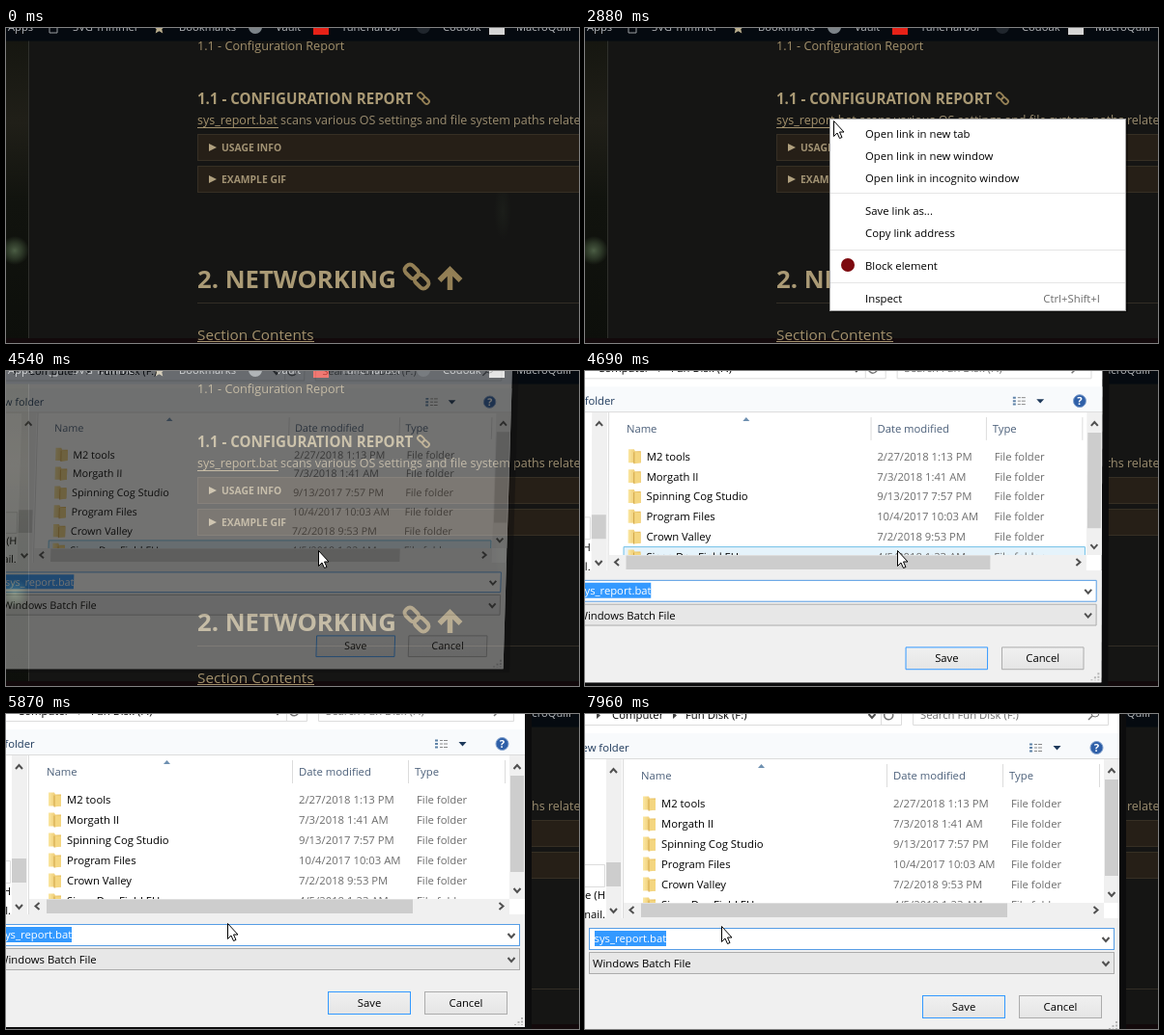
Animation of 593x327 px, one loop 7.99 s. Source, as an HTML page:

```html
<!DOCTYPE html>
<html lang="en">
<head>
<meta charset="utf-8">
<title>Saving a linked file</title>
<style>
  html, body { margin: 0; width: 100%; height: 100%; overflow: hidden; background: #141414; }
  svg { display: block; width: 593px; height: 327px; font: 11.3px "Open Sans", "Noto Sans", sans-serif; }
  .bar { font-size: 11.2px; fill: #b4b7ba; }
  .body { font-size: 12.5px; fill: #9b8d70; }
  .link { fill: #a3916c; }
  .head { font-weight: 700; fill: #aa9a75; }
  .small { font-size: 10.35px; font-weight: 700; fill: #a19273; }
  .menu { font-size: 11.35px; }
  .muted { fill: #6d6d6d; }
  .navy { fill: #1e395b; }
  .column { fill: #4c607a; }
  .line { fill: none; stroke: #dcdcdc; }
  .track { fill: #f0f0f0; }
  .thumb { fill: #cdcdcd; }
</style>
</head>
<body>
<svg viewBox="0 0 593 327">
  <defs>
    <linearGradient id="forest" x2="0" y2="1">
      <stop offset="0" stop-color="#14150f"/>
      <stop offset=".3" stop-color="#201f18"/>
      <stop offset=".55" stop-color="#11130e"/>
      <stop offset="1" stop-color="#0d0f0b"/>
    </linearGradient>
    <radialGradient id="glow">
      <stop offset="0" stop-color="#4c5e45"/>
      <stop offset=".5" stop-color="#364430" stop-opacity=".8"/>
      <stop offset="1" stop-color="#364430" stop-opacity="0"/>
    </radialGradient>
    <linearGradient id="folderFill">
      <stop offset="0" stop-color="#fbe7a2"/>
      <stop offset="1" stop-color="#e3b54e"/>
    </linearGradient>
    <linearGradient id="buttonFill" x2="0" y2="1">
      <stop offset="0" stop-color="#f0f0f0"/>
      <stop offset="1" stop-color="#e5e5e5"/>
    </linearGradient>
    <path id="chevron" d="M-3.5-2L0 2L3.5-2" fill="none" stroke="#505050" stroke-width="2"/>
    <g id="chain" transform="rotate(45)" fill="none" stroke="#937f55" stroke-width="4">
      <rect x="-15" y="-5.200" width="15.500" height="10.400" rx="4.500"/>
      <rect x="-.5" y="-5.200" width="15.500" height="10.400" rx="4.500"/>
    </g>
    <g id="folder">
      <path d="M0 0h6l1 2h6v12H0z" fill="url(#folderFill)"/>
      <path d="M6 3h7v11l-7 1z" fill="#f4d680"/>
      <path d="M6 3v12" stroke="#c99a3c" stroke-width=".8"/>
    </g>
  </defs>

  <g id="page">
    <rect width="593" height="327" fill="#151514"/>
    <rect width="23" height="327" fill="url(#forest)"/>
    <circle cx="9" cy="231" r="15" fill="url(#glow)"/>
    <ellipse cx="514" cy="190" rx="9" ry="30" fill="url(#glow)" opacity=".12"/>
    <path d="M23.5 13V327" stroke="#2f302c"/>
    <rect y="322" width="593" height="5" fill="#12090b"/>
    <rect width="593" height="13.5" fill="#050a10"/>
    <g class="bar">
      <text x="2" y="3">Apps</text>
      <path d="M45-6h8V5h-8z" fill="none" stroke="#9a9da0"/>
      <text x="69" y="3">SVG Trimmer</text>
      <path d="M158.500-6l1.800 4 4.200.4-3.200 2.800 1 4.300-3.800-2.300-3.800 2.300 1-4.300-3.200-2.800 4.200-.4z" fill="#b9ad8d"/>
      <text x="179" y="3">Bookmarks</text>
      <circle cx="258" cy="-1" r="7" fill="#7c8388"/>
      <text x="279" y="3">Vault</text>
      <rect x="318" y="-9" width="16" height="16" fill="#e62117"/>
      <text x="347" y="3">TuneHarbor</text>
      <circle cx="432" cy="-1" r="7" fill="#20262d"/>
      <text x="452" y="3">Codoak</text>
      <rect x="500" y="-9" width="16" height="16" fill="#d5d5d5"/>
      <text x="528" y="3">MacroQuill</text>
    </g>

    <text class="body link" x="198" y="22.500" style="font-size:12.65px">1.1 - Configuration Report</text>
    <text class="head" x="198" y="78.500" font-size="15.100">1.1 - CONFIGURATION REPORT</text>
    <use href="#chain" transform="translate(432 73) scale(.48)"/>
    <rect id="linkHover" x="198" y="88" width="84" height="16" fill="#3b2b1c"/>
    <text class="body" x="198" y="100"><tspan class="link">sys_report.bat</tspan> scans various OS settings and file system paths related to</text>
    <path d="M198 103.500h84" stroke="#a3916c"/>
    <g fill="#261f17" stroke="#362f24">
      <rect x="198.500" y="110.500" width="400" height="27"/>
      <rect x="198.500" y="143.500" width="400" height="27"/>
    </g>
    <path d="M210 120l8 4-8 4zM210 153l8 4-8 4z" fill="#b0a07e"/>
    <text class="small" x="223" y="128">USAGE INFO</text>
    <text class="small" x="223" y="161">EXAMPLE GIF</text>
    <text class="head" x="198" y="269.500" font-size="25.700">2. NETWORKING</text>
    <use href="#chain" transform="translate(425 258)"/>
    <path d="M448.500 262L459.500 251L470.500 262M459.500 253V272" fill="none" stroke="#937f55" stroke-width="5.500"/>
    <path d="M198 285.500H593" stroke="#332e26"/>
    <text class="body link" x="198" y="324" style="font-size:15.3px">Section Contents</text>
    <path d="M198 325.500h121" stroke="#a3916c"/>
  </g>

  <g id="menu" class="menu">
    <rect x="256" y="97" width="306" height="198" fill="#000" opacity=".35"/>
    <rect x="253.500" y="94.500" width="306" height="199" fill="#fff" stroke="#a5a5a5"/>
    <rect id="menuHover" x="254" width="305" height="23" fill="#e9e9e9"/>
    <path d="M254 171.500h305M254 230.500h305M254 264.500h305" stroke="#e5e5e5"/>
    <circle cx="272" cy="246" r="7" fill="#7d0a0f"/>
    <g id="menuItems"></g>
    <text class="muted" x="533" y="285" text-anchor="end">Ctrl+Shift+I</text>
  </g>

  <g id="dialog">
    <rect x="-60" y="-40" width="604" height="369" fill="#0c0c0d"/>
    <rect x="-60" y="-40" width="597" height="365" fill="#fff"/>
    <path class="line" d="M-60 7.500H311.500V-20M290.500-20V7M323.500-20V7.500H525.500V-20"/>
    <text x="12" y="1">Computer</text>
    <text x="88" y="1">Fun Disk (F:)</text>
    <text class="muted" x="331" y="1">Search Fun Disk (F:)</text>
    <path d="M75-6l4 3.500-4 3.500zM-4-6l4 3.500-4 3.500z" fill="#444"/>
    <use href="#chevron" x="281" y="-2"/>
    <path d="M302.500-4a4.500 4.500 0 1 1-3-3M509-2L505 2" fill="none" stroke="#777" stroke-width="1.500"/>
    <circle cx="512" cy="-5" r="4" fill="none" stroke="#777"/>

    <rect x="-60" y="16" width="597" height="26" fill="#f8fafc"/>
    <path class="line" d="M-60 42.500H537"/>
    <text class="navy" x="-28" y="35">New folder</text>
    <path d="M444 27.500h3M444 31h3M444 34.500h3" stroke="#5f83a8" stroke-width="2"/>
    <path d="M449 27.500h3m1 0h4M449 31h3m1 0h4M449 34.500h3m1 0h4" stroke="#888"/>
    <path d="M468.500 29h8l-4 4.500z" fill="#1e395b"/>
    <circle cx="513.500" cy="31" r="6.500" fill="#2e5fa8" stroke="#7f9fcc"/>
    <text x="513.500" y="35" text-anchor="middle" font-weight="700" fill="#fff">?</text>

    <path class="line" d="M-60 152.500H4.500V175.500H-60"/>
    <text x="5" y="188" text-anchor="end">Archive (H</text>
    <text x="5" y="208" text-anchor="end">mail.</text>
    <rect class="track" x="6" y="43" width="16" height="165"/>
    <rect class="thumb" x="6" y="150" width="15" height="25"/>
    <use href="#chevron" transform="translate(13.500 55) scale(1 -1)"/>
    <use href="#chevron" x="13.500" y="200"/>
    <path class="line" d="M23.500 43V208M296.500 48V72M416.500 48V72M516.500 48V72"/>

    <path d="M163 52l3.500-4 3.500 4z" fill="#6d8fb0"/>
    <g class="column">
      <text x="42" y="64">Name</text>
      <text x="303" y="64">Date modified</text>
      <text x="423" y="64">Type</text>
    </g>
    <rect id="rowHover" x="39.500" width="480" height="20" fill="#e5f3fb" stroke="#70c0e7"/>
    <g id="rows"></g>
    <rect class="track" x="24" y="192" width="497" height="16"/>
    <rect class="thumb" x="42" y="192.500" width="379" height="14.500"/>
    <use href="#chevron" transform="translate(32.500 199.500) rotate(90)"/>
    <use href="#chevron" transform="translate(512.500 199.500) rotate(-90)"/>
    <rect class="track" x="521" y="43" width="16" height="149"/>
    <rect class="thumb" x="522" y="64" width="14" height="100"/>
    <use href="#chevron" transform="translate(529 55) scale(1 -1)"/>
    <use href="#chevron" x="529" y="183"/>

    <rect x="-60" y="208" width="597" height="117" fill="#f0f0f0"/>
    <rect x="-11.500" y="218.500" width="543" height="22" fill="#fff" stroke="#569de5"/>
    <rect x="-6" y="221" width="74" height="16" fill="#3399ff"/>
    <text x="-6.500" y="233" fill="#fff">sys_report.bat</text>
    <rect x="-11.500" y="243.500" width="543" height="22" fill="#e7e7e7" stroke="#acacac"/>
    <text x="-8" y="259">Windows Batch File</text>
    <use href="#chevron" x="523" y="230"/>
    <use href="#chevron" x="523" y="255"/>
    <g fill="url(#buttonFill)">
      <rect x="333.500" y="288.500" width="85" height="23" stroke="#3399ff"/>
      <rect x="433.500" y="288.500" width="85" height="23" stroke="#acacac"/>
    </g>
    <g text-anchor="middle">
      <text x="376" y="304">Save</text>
      <text x="476" y="304">Cancel</text>
    </g>
    <path d="M534 315v8M530.500 319v4M527 322v1" stroke="#b5b5b5" stroke-width="2" stroke-dasharray="2 1.500"/>
  </g>

  <g id="pointer" fill="#fff" stroke="#000">
    <path id="arrow" d="M.5.5V16.500L4 13L6.500 18.500L9 17.500L6.500 12H11z"/>
    <path id="hand" transform="translate(-6.500)" d="M5 2Q5 .5 6.500 .5T8 2V8Q10 6.500 11 8.500Q13 7.500 13.500 9.500Q16 9 16.500 11.500V15Q16 18 14.500 20V22H6.500V20L1 13.500Q-.5 11.500 1.500 11T5 13z"/>
  </g>
</svg>
<script>
const LOOP = 7990;
const byId = id => document.getElementById(id);
const clamp = v => Math.min(1, Math.max(0, v));
const show = (id, visible) => byId(id).setAttribute('display', visible ? 'inline' : 'none');

const menuItems = [
  [110, 'Open link in new tab'], [133, 'Open link in new window'],
  [156, 'Open link in incognito window'], [190, 'Save link as...'],
  [213, 'Copy link address'], [247, 'Block element'], [281, 'Inspect']
];
byId('menuItems').innerHTML = menuItems
  .map(([y, label]) => `<text x="290" y="${y + 4}">${label}</text>`).join('');

const ROW_TOP = 78.5, ROW_HEIGHT = 21;
const folders = [
  ['M2 tools', '2/27/2018 1:13 PM'], ['Morgath II', '7/3/2018 1:41 AM'],
  ['Spinning Cog Studio', '9/13/2017 7:57 PM'], ['Program Files', '10/4/2017 10:03 AM'],
  ['Crown Valley', '7/2/2018 9:53 PM'], ['Siege Day Field EU', '4/5/2018 1:23 AM']
];
byId('rows').innerHTML = folders.map(([name, date], i) => {
  const y = 93 + i * ROW_HEIGHT;
  return `<use href="#folder" x="44" y="${y - 11.5}"/><text x="63" y="${y}">${name}</text>
    <g class="muted"><text x="303" y="${y}">${date}</text><text x="425" y="${y}">File folder</text></g>`;
}).join('');

// Pointer path as [time, x, y]; it rests wherever a position repeats.
const path = [
  [40, 499, 306], [940, 499, 306], [1060, 503, 222], [1280, 503, 222],
  [1960, 257, 96], [3130, 257, 96], [3620, 326, 186], [4460, 326, 186],
  [4490, 323, 186], [5070, 323, 186], [5330, 293, 190], [5480, 180, 150],
  [5600, 190, 86], [5740, 290, 140], [5870, 230, 217], [6050, 130, 110],
  [6250, 90, -30], [7100, 90, -30], [7130, 150, -30], [7530, 138, 220],
  [7930, 138, 220], [7960, 141, 220], [LOOP, 141, 220]
];

function slope(i, axis) {
  const before = path[i - 1], at = path[i], after = path[i + 1];
  const resting = p => !p || (p[1] === at[1] && p[2] === at[2]);
  if (resting(before) || resting(after)) return 0;
  return (after[axis] - before[axis]) / (after[0] - before[0]);
}

function pointerAt(t) {
  const i = Math.max(0, path.findIndex(p => p[0] > t) - 1);
  const a = path[i], b = path[i + 1], span = b[0] - a[0];
  const u = clamp((t - a[0]) / span), v = 1 - u;
  return [1, 2].map(k =>
    a[k] * (1 + 2 * u) * v * v + b[k] * u * u * (3 - 2 * u) +
    span * (slope(i, k) * u * v * v - slope(i + 1, k) * u * u * v));
}

const dragSteps = [[6, 2], [10, 3], [14, 4], [16, 4]];

function dialogOffset(t) {
  return t < 6790 ? [0, 0] : dragSteps[Math.min(3, Math.floor((t - 6790) / 50))];
}

function drawMenu(t, y) {
  const open = t >= 2850 && t < 4080;
  show('menu', open);
  if (!open) return;
  byId('menu').setAttribute('opacity', t < 2880 ? 0.5 : 1);
  const hovered = menuItems.find(item => Math.abs(item[0] - y) <= 11.5);
  show('menuHover', hovered);
  if (hovered) byId('menuHover').setAttribute('y', hovered[0] - 12);
}

function drawDialog(t, x, y) {
  const open = t >= 4490;
  show('dialog', open);
  if (!open) return;
  const [dx, dy] = dialogOffset(t);
  // The window tilts forward and grows while it fades in.
  const tilt = (1 - clamp((t - 4470) / 300)) ** 2 * 1.7;
  const matrix = [1 - 0.047 * tilt, 0, -0.029 * tilt, 1 - 0.058 * tilt, 12 * tilt + dx, 3 * tilt + dy];
  byId('dialog').setAttribute('transform', `matrix(${matrix})`);
  byId('dialog').setAttribute('opacity', clamp((t - 4470) / 180));

  const row = Math.floor((y - dy - ROW_TOP) / ROW_HEIGHT);
  const hovering = x - dx > 39 && x - dx < 520 && row >= 0 && y - dy < 192;
  show('rowHover', hovering);
  if (hovering) byId('rowHover').setAttribute('y', ROW_TOP + row * ROW_HEIGHT);
}

function draw(t) {
  const [x, y] = pointerAt(t).map(Math.round);
  const onLink = t < 2850 && x >= 198 && x < 282 && y >= 88 && y < 104;
  show('linkHover', onLink);
  show('hand', onLink);
  show('arrow', !onLink);
  show('pointer', t >= 40);
  byId('pointer').setAttribute('transform', `translate(${x} ${y})`);
  drawMenu(t, y);
  drawDialog(t, x, y);
}

const start = performance.now();
function tick() {
  draw((performance.now() - start) % LOOP);
  requestAnimationFrame(tick);
}
tick();
</script>
</body>
</html>
```
